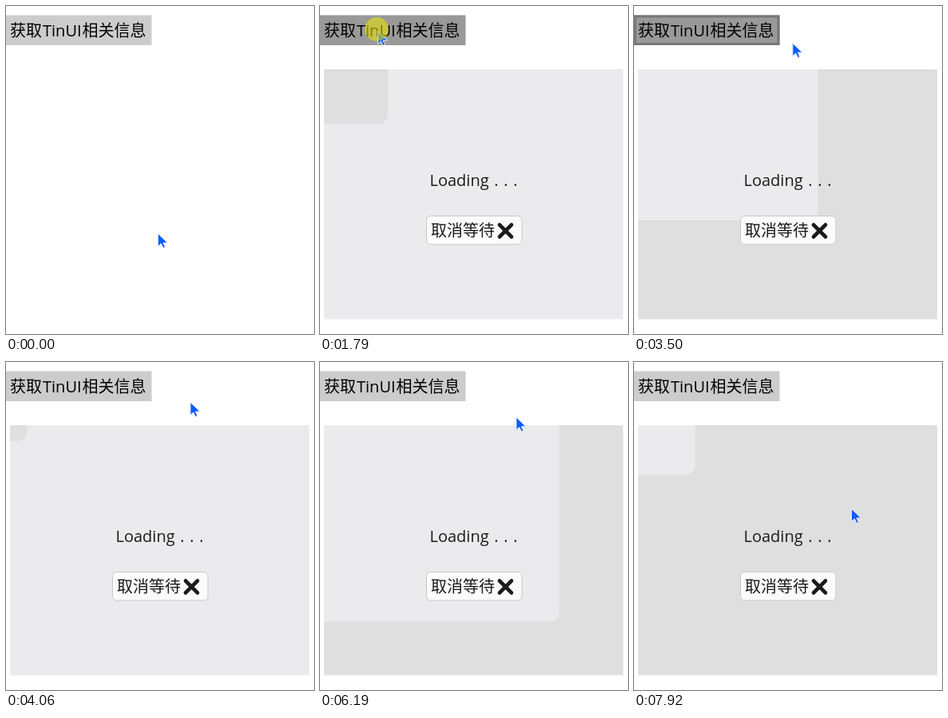
Write an HTML page that moves like this. It is 386 px wide and 410 px high and loops after 7990 ms.

```html
<!DOCTYPE html>
<html lang="zh">
<head>
<meta charset="utf-8">
<title>TinUI</title>
<style>
  html, body { margin: 0; width: 100%; height: 100%; overflow: hidden; background: #fff; }
  svg { display: block; }
  text { font: 20px "Open Sans", "Noto Sans CJK SC", "Noto Sans CJK", sans-serif; white-space: pre; }
  .cjk { font-family: "Noto Sans CJK SC", "Noto Sans CJK", sans-serif; }
  #wait text { fill: #1b1b1b; }
</style>
</head>
<body>
<svg width="386" height="410" viewBox="0 0 386 410">
  <rect id="face" y="11.5" width="182.5" height="37.5"/>
  <rect id="edge" x="1.5" y="13" width="179.5" height="34.5" fill="none" stroke="#777" stroke-width="3"/>
  <text class="cjk" x="5" y="38">获取</text>
  <text x="46" y="38">TinUI</text>
  <text class="cjk" x="95.5" y="38">相关信息</text>

  <g id="wait">
    <rect id="panel" x="5" y="79" width="375" height="312.5"/>
    <path id="fill"/>
    <text x="137.5" y="225" word-spacing="1.5">Loading . . .</text>
    <rect x="133.5" y="262.5" width="119.5" height="35.5" rx="5" fill="#fbfbfb" stroke="#c8c8c8"/>
    <text class="cjk" x="139" y="288">取消等待</text>
    <path d="M225 273.5l15 15m0 -15l-15 15" stroke="#1b1b1b" stroke-width="4.6" stroke-linecap="round"/>
  </g>

  <path id="mouse" d="M.5 .5V16.5L4.3 13L7 18.5L9.5 17.4L7 12H12.5Z" fill="#0a5cff" stroke="#e4ecfb"/>
  <circle id="press" cx="71" cy="29" r="15" fill="#ece600" opacity=".55"/>
</svg>
<script>
const LOOP = 7990, CLICK = 1790;
const W = 375, H = 312, R = 14;
const SPEED = 0.3045, SWEEP_START = 1528;   // block growth in px per ms
const LIGHT = '#ebebed', DARK = '#dfdfdf';
const $ = id => document.getElementById(id);
const [face, edge, wait, panel, fill, press, mouse] =
  ['face', 'edge', 'wait', 'panel', 'fill', 'press', 'mouse'].map($);

const linear = u => u;
const easeIn = u => u * u;
const easeOut = u => u * (2 - u);
const easeInOut = u => u * u * (3 - 2 * u);

const glides = [
  { from: 300, to: 1260, start: [190, 284], end: [72, 31], ease: easeInOut },
  { from: 2730, to: 4140, start: [72, 31], end: [231, 50], ease: easeOut },
  { from: 5370, to: 6880, start: [231, 50], end: [280, 113], ease: easeIn },
  { from: 6880, to: 7920, start: [280, 113], end: [272, 183], ease: linear, bulge: 14 }
];

function pointer(t) {
  const g = glides.filter(g => t >= g.from).pop() || glides[0];
  const u = Math.min(1, Math.max(0, (t - g.from) / (g.to - g.from)));
  const [x, y] = g.start.map((a, i) => a + (g.end[i] - a) * g.ease(u));
  return [x + (g.bulge || 0) * Math.sin(Math.PI * u), y];
}

const show = (el, on) => el.setAttribute('visibility', on ? 'visible' : 'hidden');

// each pass grows a block over the other shade, then the shades swap
function drawBlock(t) {
  const total = Math.max(0, t - SWEEP_START) * SPEED;
  const odd = Math.floor(total / W) % 2;
  const w = total % W;
  const r = Math.min(R, w);
  const h = Math.max(r, R + (w - R) * (H - R) / (W - R));
  panel.setAttribute('fill', odd ? DARK : LIGHT);
  fill.setAttribute('fill', odd ? LIGHT : DARK);
  fill.setAttribute('d', `M5 79h${w}v${h - r}q0 ${r} ${-r} ${r}h${r - w}z`);
}

function draw(t) {
  const over = t >= 1060 && t < 3570;
  const pressed = t >= CLICK && t < CLICK + 270;
  face.setAttribute('fill', over ? '#999' : '#ccc');
  show(edge, over && !pressed);
  show(wait, t >= CLICK);
  show(press, t >= CLICK && t < CLICK + 130);
  drawBlock(t);
  mouse.setAttribute('transform', `translate(${pointer(t)})`);
}

const origin = performance.now();
function frame() {
  draw((performance.now() - origin) % LOOP);
  requestAnimationFrame(frame);
}
frame();
</script>
</body>
</html>
```
